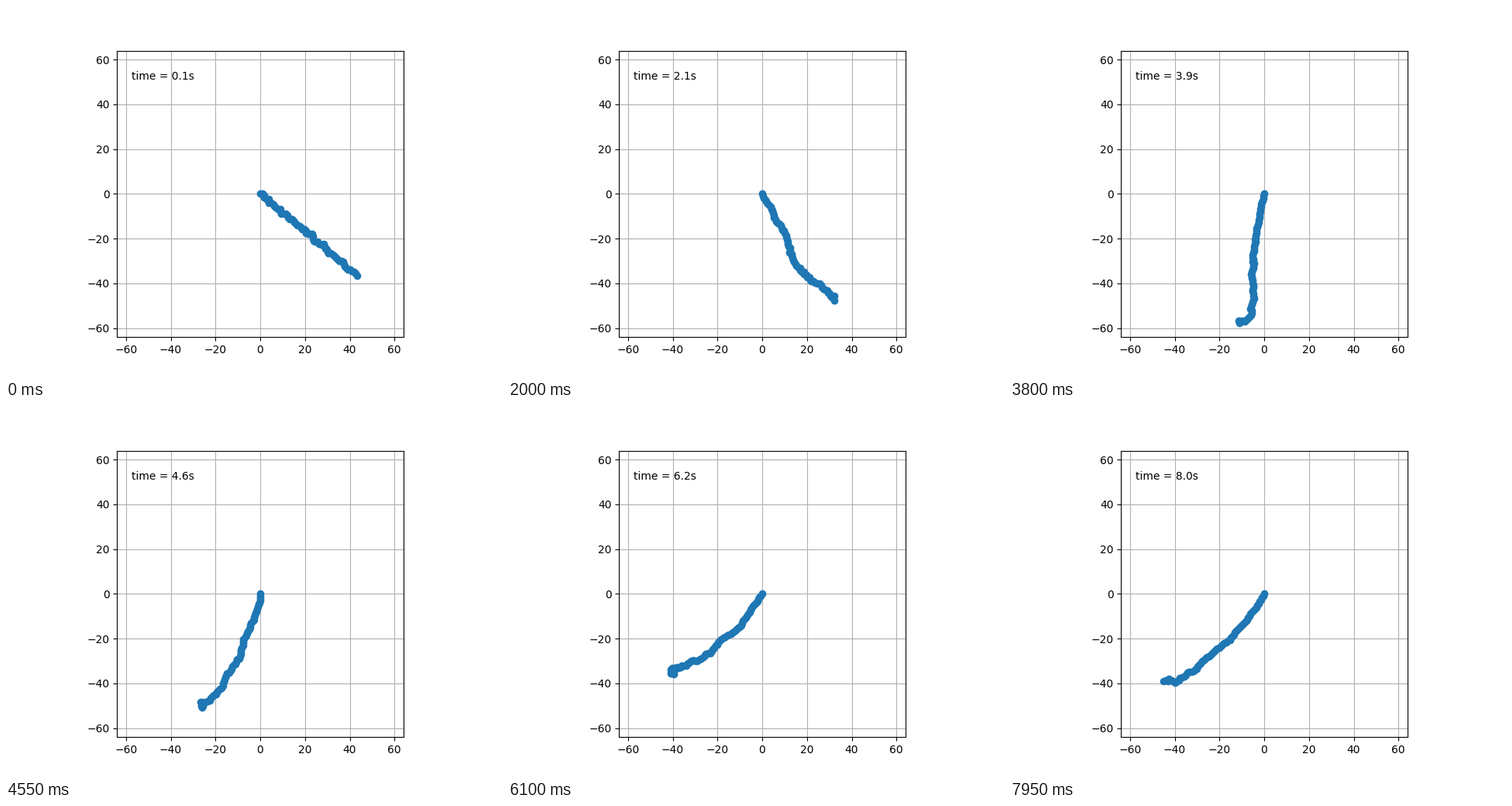
These frames come from a looping animation (640 px wide and 480 px high, 8 s). A matplotlib script:

```python
import numpy as np
import matplotlib.pyplot as plt
from matplotlib.animation import FuncAnimation

FRAMES, DT, SUBSTEPS = 160, 0.05, 8
LINKS = 64
GRAVITY = 9.8
JOINT_DAMPING = 0.04
START_ANGLE, KINK = 0.87, 0.85  # radians, angle measured from straight down

# Unit links with a unit mass at each lower end
order = np.arange(LINKS)
carried = LINKS - order
mass = LINKS - np.maximum.outer(order, order)


def acceleration(angle, spin):
    """Equation of motion of a hanging chain of rigid links."""
    diff = angle[:, None] - angle
    bend = np.diff(spin)
    torque = (-(mass * np.sin(diff)) @ spin ** 2
              - GRAVITY * carried * np.sin(angle))
    torque[:-1] += JOINT_DAMPING * bend
    torque[1:] -= JOINT_DAMPING * bend
    return np.linalg.solve(mass * np.cos(diff), torque)


def rate(state):
    return np.array([state[1], acceleration(*state)])


def step(state, h):
    k1 = rate(state)
    k2 = rate(state + h / 2 * k1)
    k3 = rate(state + h / 2 * k2)
    k4 = rate(state + h * k3)
    return state + h / 6 * (k1 + 2 * k2 + 2 * k3 + k4)


def kinked_start():
    """Chain at rest on a slanted line, with bends that cancel out."""
    rng = np.random.default_rng(4)
    bends = rng.uniform(-KINK, KINK, (LINKS // 4, 2))
    angle = START_ANGLE + np.hstack([bends, -bends]).ravel()
    return np.array([angle, np.zeros(LINKS)])


def joints(angle):
    ends = np.cumsum([np.sin(angle), -np.cos(angle)], axis=1)
    return np.hstack([np.zeros((2, 1)), ends])


def swing():
    state, path = kinked_start(), []
    for _ in range(FRAMES):
        path.append(joints(state[0]))
        for _ in range(SUBSTEPS):
            state = step(state, DT / SUBSTEPS)
    return path


path = swing()

fig = plt.figure(figsize=(6.4, 4.8), dpi=100)
ax = fig.add_subplot(xlim=(-LINKS, LINKS), ylim=(-LINKS, LINKS))
ax.set_aspect("equal")
ax.grid()
line, = ax.plot([], [], "o-", lw=2)
label = ax.text(0.05, 0.9, "", transform=ax.transAxes)


def draw(i):
    line.set_data(*path[i])
    label.set_text("time = %.1fs" % ((i + 1) * DT))
    return line, label


ani = FuncAnimation(fig, draw, frames=FRAMES, init_func=lambda: draw(0),
                    interval=DT * 1000, repeat=True, repeat_delay=0)
plt.show()
```
